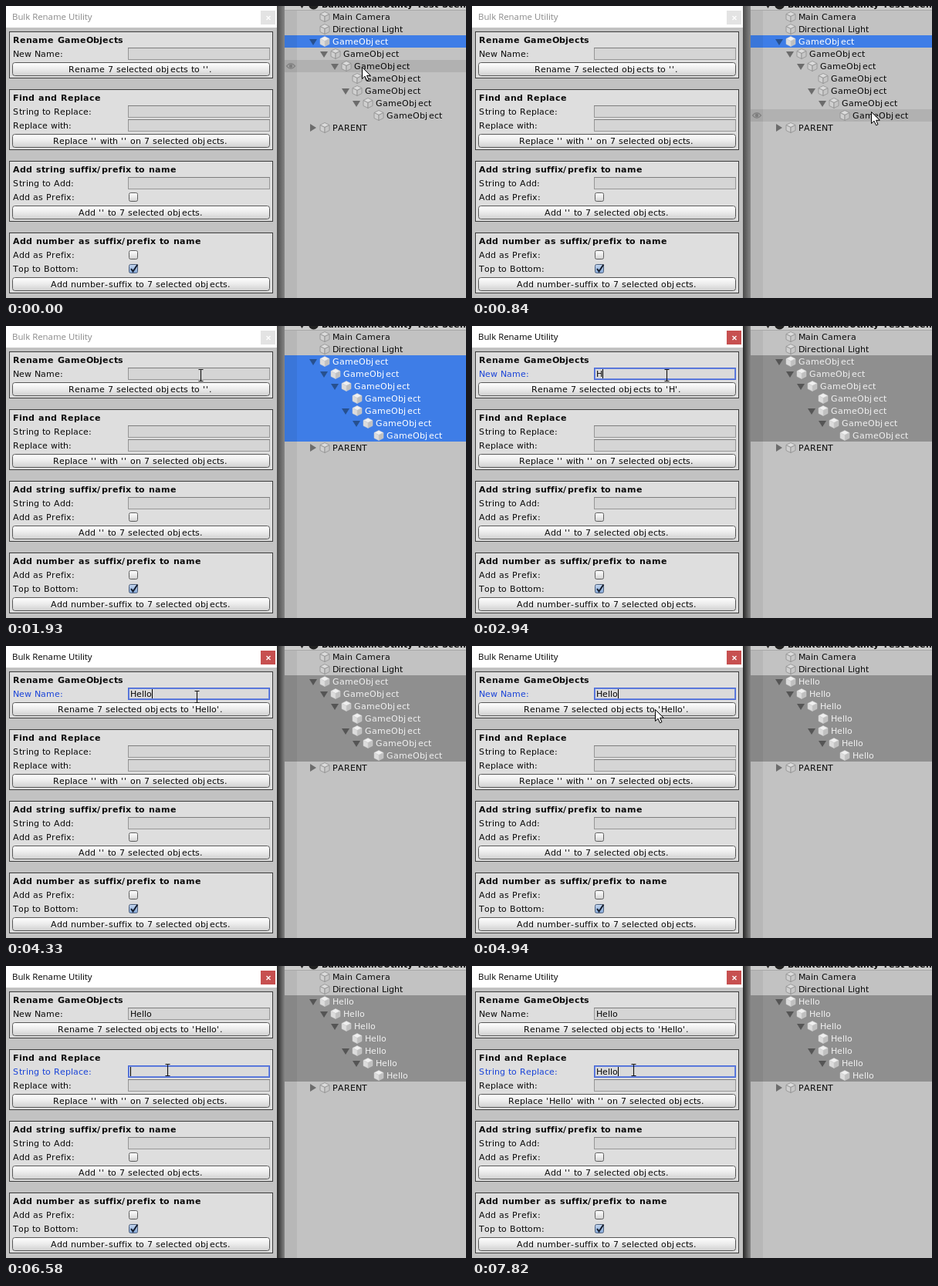
These frames come from a looping animation (596 px wide and 379 px high, 8000 ms). An HTML page:

```html
<!DOCTYPE html>
<html lang="en">
<head>
<meta charset="utf-8">
<title>Bulk rename panel</title>
<style>
  html, body { margin: 0; width: 100%; height: 100%; overflow: hidden; background: #c2c2c2; }
  svg { display: block; width: 596px; height: 379px; }
  text { font: 11px "DejaVu Sans", Verdana, sans-serif; font-variant-ligatures: none; fill: #0a0a0a; white-space: pre; }
  .bold { font-weight: bold; }
  .title { font: 11.4px "Open Sans", "Noto Sans", sans-serif; fill: #8a8a8a; }
  .active .title { fill: #000; }
  .close { fill: #e3e3e3; }
  .active .close { fill: #c75050; }
  .near { stop-color: #4c4c4c; }
  .active .near { stop-color: #262626; }
  .frame { fill: #979797; }
  .edge { fill: #7d7d7d; }
  .field { fill: #d5d5d5; stroke: #d5d5d5; }
  .caret { fill: #000; visibility: hidden; }
  .focus text.label { fill: #1a44d8; }
  .focus .frame, .focus .edge { fill: #4466d8; }
  .focus .field { fill: #dadada; stroke: #6e88dd; }
  .focus .caret { visibility: visible; }
  .fold { fill: #6c6c6c; }
  .top { fill: #dcdcdc; }
  .left { fill: #d0d0d0; }
  .right { fill: #c6c6c6; }
  .cube { stroke: #8e8e8e; stroke-width: .8; stroke-linejoin: round; }
  .bar { fill: none; }
  .on .bar { fill: #3e7de7; }
  .on text { fill: #fff; }
  .on .fold { fill: #27508f; }
  .on .cube { stroke: #d2d2d2; stroke-width: .5; }
  .on .top { fill: #f0f0f0; }
  .on .left { fill: #dcdcdc; }
  .on .right { fill: #c0c0c0; }
  .active .on .bar { fill: #8f8f8f; }
  .active .on text { fill: #f0f0f0; }
  .active .on .fold { fill: #555; }
</style>
</head>
<body>
<svg id="stage" viewBox="0 0 596 379">
  <defs>
    <linearGradient id="push" x2="0" y2="1">
      <stop offset="0" stop-color="#fff"/><stop offset=".5" stop-color="#ebebeb"/><stop offset="1" stop-color="#d0d0d0"/>
    </linearGradient>
    <linearGradient id="tick" x2="0" y2="1">
      <stop offset="0" stop-color="#c4d6ee"/><stop offset="1" stop-color="#86a9d8"/>
    </linearGradient>
    <linearGradient id="gap">
      <stop offset="0" class="near"/><stop offset="1" stop-color="#858585"/>
    </linearGradient>
  </defs>
</svg>
<script>
const LOOP = 8000;
const stage = document.getElementById('stage');
const pen = document.createElement('canvas').getContext('2d');

function el(tag, attrs, parent = stage) {
  const node = document.createElementNS('http://www.w3.org/2000/svg', tag);
  for (const key in attrs) node.setAttribute(key, attrs[key]);
  return parent.appendChild(node);
}
const rect = (x, y, width, height, attrs, parent) =>
  el('rect', { x, y, width, height, ...attrs }, parent);
const path = (d, attrs, parent) => el('path', { d, ...attrs }, parent);

// Whole-pixel glyph advances, as in a hinted interface font
const advances = {
  normal: { ' ': 4, '.': 4, j: 5, ':': 5, "'": 4, '-': 5, S: 8 },
  bold: { ' ': 5, '/': 6, j: 4 }
};
function advance(ch, weight) {
  const cache = advances[weight];
  if (!(ch in cache)) {
    pen.font = weight + ' 1100px "DejaVu Sans", Verdana, sans-serif';
    cache[ch] = Math.floor(pen.measureText(ch).width / 100 + (weight === 'bold' ? .6 : .5));
  }
  return cache[ch];
}
const textWidth = (str, weight = 'normal') =>
  [...str].reduce((sum, ch) => sum + advance(ch, weight), 0);

function setText(node, x, str, weight = 'normal') {
  if (node.textContent === str) return;
  const xs = [];
  for (const ch of str) {
    xs.push(x);
    x += advance(ch, weight);
  }
  node.setAttribute('x', xs.join(' '));
  node.textContent = str;
}
function label(x, y, str, parent, cls = '') {
  const node = el('text', { y, class: cls }, parent);
  setText(node, x, str, cls === 'bold' ? 'bold' : 'normal');
  return node;
}

// Tool window
rect(0, 0, 351, 379, { fill: '#c2c2c2' });
rect(0, 0, 351, 28, { fill: '#fff' });
el('text', { x: 8, y: 18, class: 'title' }).textContent = 'Bulk Rename Utility';
rect(330, 6, 19, 18, { class: 'close' });
path('M337.5 13l5 5m0-5l-5 5', { stroke: '#fff', 'stroke-width': 1.3 });
rect(351, 0, 10, 379, { fill: 'url(#gap)' });

function group(y, height, heading) {
  rect(4.5, y + .5, 341, height - 1, { fill: '#dedede', stroke: '#3c3c3c' });
  label(9, y + 15, heading, stage, 'bold');
}
function field(y, name) {
  const g = el('g', {});
  label(9, y, name, g, 'label');
  rect(158, y - 12, 184, 16, { class: 'frame' }, g);
  rect(158, y - 12, 184, 1, { class: 'edge' }, g);
  rect(159.5, y - 10.5, 181, 13, { class: 'field' }, g);
  const value = label(161, y, '', g);
  const caret = rect(161, y - 10, 1, 12, { class: 'caret' }, g);
  return (str, focused) => {
    setText(value, 161, str);
    caret.setAttribute('x', 161 + textWidth(str));
    g.setAttribute('class', focused ? 'focus' : '');
  };
}
function check(y, name, on) {
  label(9, y, name);
  rect(159.5, y - 9.5, 11, 11, { rx: 2, fill: on ? 'url(#tick)' : 'url(#push)', stroke: on ? '#4d5f7c' : '#5f5f5f' });
  if (on) path(`M162 ${y - 4}l2.5 3.5l6-9`, { fill: 'none', stroke: '#141c2c', 'stroke-width': 2 });
}
function button(y, str) {
  rect(8.5, y - 12.5, 333, 17, { rx: 3, fill: 'url(#push)', stroke: '#585858' });
  const node = label(0, y, '');
  const set = s => setText(node, Math.floor(174.5 - textWidth(s) / 2), s);
  set(str);
  return set;
}

group(33, 61, 'Rename GameObjects');
const nameField = field(66, 'New Name:');
const renameButton = button(86, '');
group(108, 79, 'Find and Replace');
const findField = field(141, 'String to Replace:');
field(159, 'Replace with:')('', false);
const replaceButton = button(179, '');
group(201, 79, 'Add string suffix/prefix to name');
field(234, 'String to Add:')('', false);
check(252, 'Add as Prefix:', false);
button(272, "Add '' to 7 selected objects.");
group(294, 79, 'Add number as suffix/prefix to name');
check(327, 'Add as Prefix:', false);
check(345, 'Top to Bottom:', true);
button(365, 'Add number-suffix to 7 selected objects.');

// Hierarchy
rect(361, 0, 235, 379, { fill: '#c2c2c2' });
const hover = el('g', {});
rect(361, 0, 235, 16, { fill: '#b1b1b1' }, hover);
path('M363.500 8q5.500-6.500 11 0q-5.500 6.500-11 0z', { fill: 'none', stroke: '#8b8b8b', 'stroke-width': 1.3 }, hover);
el('circle', { cx: 369, cy: 8, r: 2.3, fill: '#858585' }, hover);

function cube(x, y, parent) {
  const g = el('g', { class: 'cube', transform: `translate(${x} ${y})` }, parent);
  path('M0-6.500L6-3.500L0-.5L-6-3.500z', { class: 'top' }, g);
  path('M-6-3.500L0-.5V6.500L-6 3.500z', { class: 'left' }, g);
  path('M6-3.500L0-.5V6.500L6 3.500z', { class: 'right' }, g);
}
// Name, depth, fold arrow
const rows = [
  ['Main Camera', 0, ''], ['Directional Light', 0, ''],
  ['', 0, 'open'], ['', 1, 'open'], ['', 2, 'open'], ['', 3, ''],
  ['', 3, 'open'], ['', 4, 'open'], ['', 5, ''],
  ['PARENT', 0, 'shut']
].map(([name, depth, fold], i) => {
  const g = el('g', {}), x = 14 * depth, y = 14 + 16 * i;
  rect(361, y - 8, 235, 16, { class: 'bar' }, g);
  if (fold === 'open') path(`M${393 + x} ${y - 3}h10l-5 8z`, { class: 'fold' }, g);
  if (fold === 'shut') path(`M394 ${y - 5}v10l8-5z`, { class: 'fold' }, g);
  cube(413 + x, y, g);
  return { g, x: 423 + x, text: label(423 + x, y + 4, name, g), child: !name };
});
rect(361, 0, 16, 379, { fill: '#000', opacity: .06 });

rect(361, 0, 235, 6, { fill: '#cbcbcb' });
rect(361, 5, 235, 1, { fill: '#a8a8a8' });
path('M379-4h9l-4.500 7z', { fill: '#222' });
el('circle', { cx: 398.5, cy: -2, r: 6.5, fill: '#222' });
label(409, 2, 'BulkRenameUtility Test Scene', stage, 'bold');

// Pointers
const arrow = path('M.5.5V15.500L4 12.200L6.500 17.800L9 16.700L6.600 11.300H11.300z',
  { fill: '#fff', stroke: '#000', 'stroke-width': 1 });
const beam = path('M-3-6.500h2.500l.5.5l.5-.5h2.500M0-6V8M-3 8.500h2.500l.5-.5l.5.5h2.500',
  { fill: 'none', stroke: '#111', 'stroke-width': 1.1 });

// Start, end, steps, bend, goal
const moves = [
  [300, 840, 8, [590, 112], [517, 137]],
  [1530, 1930, 6, [370, 92], [252, 63]],
  [4330, 4710, 6, [236, 68], [237, 82]],
  [5250, 5320, 2, [236, 83], [235, 84]],
  [5480, 6180, 10, [209, 147], [199, 142]],
  [6340, 6340, 1, [207, 135], [215, 128]],
  [6420, 6420, 1, [212, 130], [210, 133]],
  [6580, 6580, 1, [209, 133], [209, 134]]
];
function pointer(t) {
  let at = [461, 79];
  for (const [start, end, steps, bend, goal] of moves) {
    if (t < start) break;
    const k = steps > 1 ? Math.floor((t - start) / (end - start) * (steps - 1) + .08) + 1 : 1;
    const s = Math.min(1, k / steps), r = 1 - s;
    at = at.map((from, i) => Math.round(r * r * from + 2 * r * s * bend[i] + s * s * goal[i]));
  }
  return at;
}

const typed = (t, keys) => 'Hello'.slice(0, keys.filter(k => t >= k).length);
const show = (node, on) => node.setAttribute('visibility', on ? 'visible' : 'hidden');

function draw(t) {
  const name = typed(t, [2940, 3170, 3330, 3400, 3630]);
  const find = typed(t, [7200, 7430, 7510, 7670, 7820]);
  stage.setAttribute('class', t >= 2080 ? 'active' : '');
  nameField(name, t >= 2160 && t < 6030);
  findField(find, t >= 6030);
  renameButton(`Rename 7 selected objects to '${name}'.`);
  replaceButton(`Replace '${find}' with '' on 7 selected objects.`);

  rows.forEach((row, i) => {
    if (!row.child) return;
    setText(row.text, row.x, t < 4940 ? 'GameObject' : 'Hello');
    row.g.setAttribute('class', i === 2 || t >= 1220 ? 'on' : '');
  });

  const [x, y] = pointer(t);
  const row = Math.floor((y - 6) / 16);
  show(hover, x > 361);
  hover.setAttribute('transform', `translate(0 ${6 + 16 * row})`);
  const overField = x > 158 && x < 342 && (y > 53 && y < 71 || y > 126 && y < 146);
  show(arrow, !overField);
  show(beam, overField);
  arrow.setAttribute('transform', `translate(${x} ${y})`);
  beam.setAttribute('transform', `translate(${x + .5} ${y})`);
}

const began = performance.now();
function tick() {
  draw((performance.now() - began) % LOOP);
  requestAnimationFrame(tick);
}
tick();
</script>
</body>
</html>
```
